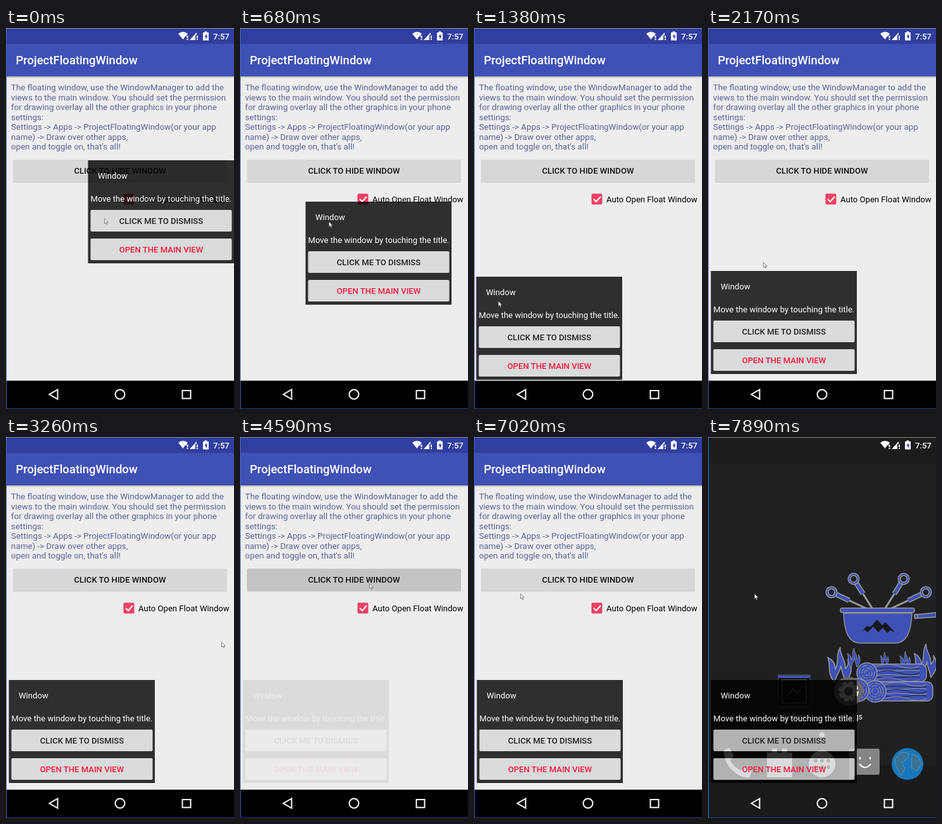
An HTML page for the animation above (8 s loop, 360 by 599 pixels).

```html
<!DOCTYPE html>
<html lang="en">
<head>
<meta charset="utf-8">
<title>Floating window</title>
<style>
html, body { margin: 0; width: 100%; height: 100%; overflow: hidden; background: #000; }
svg { display: block; width: 100vw; height: 100vh; font: 13.1px Roboto, sans-serif; }
.medium { font-weight: 500; }
.center { text-anchor: middle; }
.button { fill: #d6d7d7; }
.line { fill: none; stroke: #fff; stroke-width: 2; }
.ink { fill: #3f51b5; stroke: #999; stroke-width: 1.4; stroke-linejoin: round; }
.grain { fill: none; stroke: #999; stroke-width: 1; }
.dark { stroke: #222; }
</style>
</head>
<body>
<svg viewBox="0 0 360 599" xmlns="http://www.w3.org/2000/svg">
  <defs>
    <linearGradient id="shade" x2="0" y2="1">
      <stop stop-color="#000" stop-opacity=".28"/><stop offset="1" stop-color="#000" stop-opacity="0"/>
    </linearGradient>
    <path id="flame" d="M0 0C-12-14-5-25-10-36C-2-32 1-26 1-19C7-30 1-40 8-50C7-38 17-32 15-20C20-23 20-28 19-33C28-20 22-8 15 0C14-9 10-13 9-24C8-15 2-12 0 0Z"/>
  </defs>

  <g id="home">
    <rect width="360" height="599" fill="#202020"/>
    <rect width="360" height="42" fill="#1c1c1c"/>
    <rect y="516" width="360" height="83" fill="#1b1b1b"/>
    <g id="skewers"></g>
    <g class="ink">
      <path d="M326 279h5v6h-5zM331 279l29-3v7l-29 2z"/>
      <path d="M214 277H322C321 308 312 324 296 324H240C223 324 215 308 214 277Z"/>
      <rect x="209" y="269" width="117" height="7" rx="3"/>
      <use href="#flame" transform="translate(200 386) scale(1.1)"/>
      <use href="#flame" transform="translate(336 378) scale(1.05)"/>
      <use href="#flame" transform="translate(226 362) scale(.6)"/>
      <use href="#flame" transform="translate(276 358) scale(.4)"/>
      <use href="#flame" transform="translate(308 362) scale(.5)"/>
    </g>
    <path d="M242 307l9-10 5 2 11-12 8 9 5-5 15 16-7-3-5 4-7-8-7 7-8-9-9 9-5-4z" fill="#181818"/>
    <g id="logs"></g>
    <path d="M111 374h50v50h-50z" fill="#111" stroke="#666"/>
    <path d="M111 377h50" stroke="#3f51b5" stroke-width="4"/>
    <path d="M117 382h38v36h-38zM124 410l10-14 7 7 9-13" fill="none" stroke="#555" stroke-width="2"/>
    <circle cx="222" cy="400" r="23" fill="#666"/>
    <g fill="none" stroke="#ddd">
      <circle cx="222" cy="400" r="12" stroke-width="8" stroke-dasharray="6.3 3.1"/>
      <circle cx="222" cy="400" r="10" stroke-width="6"/>
    </g>
    <g class="center" fill="#fff" font-size="12">
      <text x="136" y="444">Gallery</text><text x="222" y="444">Settings</text>
    </g>
    <g fill="#eee">
      <circle cx="180" cy="468" r="4"/>
      <path d="M25 492l9-3 7 13-6 6q6 12 17 16l6-6 11 8-3 9q-10 3-24-8-17-13-17-35z"/>
      <path d="M93 496h40v39H93zM101 490h8v8h-8zM117 490h8v8h-8z"/>
      <circle cx="180" cy="514" r="21"/>
    </g>
    <g id="drawer" fill="#222"></g>
    <path d="M226 490h42q3 0 3 3v35q0 3-3 3h-34l-11 9v-47q0-3 3-3z" fill="#858585"/>
    <path d="M239 514q9 11 18 0" class="line"/>
    <path d="M240 503v4M256 503v4" class="line"/>
    <circle cx="315" cy="514" r="25" fill="#1976b8"/>
    <path d="M295 507l10-12 13 3-4 9-8 4 5 11-6 10-8-13zM322 499l10 3 5 12-7 11-9-5z" fill="#3a7196" stroke="#68a6cf" stroke-dasharray="2 1"/>
    <path d="M.5 0v599" stroke="#1d84c0"/>
  </g>

  <g id="app">
    <rect width="360" height="599" fill="#ededed"/>
    <rect width="360" height="26" fill="#303f9f"/>
    <rect y="25" width="360" height="51" fill="#3f51b5"/>
    <rect y="76" width="360" height="3" fill="url(#shade)"/>
    <text class="medium" x="15.500" y="57" font-size="18.5" fill="#fff">ProjectFloatingWindow</text>
    <g id="note" font-size="13.4" fill="#5a639a"></g>
    <rect x="11" y="208" width="338" height="35" rx="2" fill="#ccc"/>
    <rect id="toggle" class="button" x="11" y="207" width="338" height="35" rx="2"/>
    <text id="toggleText" class="medium center" x="180" y="229" fill="#111"></text>
    <rect x="185.500" y="260.500" width="17" height="17" rx="2" fill="#ee4062"/>
    <path d="M189 269l4 4 7-8" class="line"/>
    <text x="209" y="274">Auto Open Float Window</text>
    <rect y="554.500" width="360" height="45"/>
    <path d="M.5 0v599" stroke="#4a68ad"/>
  </g>

  <g id="panel">
    <g opacity=".8">
      <rect x="-.5" width="230.500" height="162"/>
      <rect id="dismiss" class="button" x="3.500" y="78" width="223" height="34" rx="2"/>
      <rect class="button" x="3.500" y="123" width="223" height="34" rx="2"/>
    </g>
    <text x="15" y="28.500" fill="#fff">Window</text>
    <text x="3.500" y="65" fill="#fff">Move the window by touching the title.</text>
    <text class="medium center" x="115" y="100" fill="#222">CLICK ME TO DISMISS</text>
    <text class="medium center" x="115" y="145" fill="#fa1a3c">OPEN THE MAIN VIEW</text>
  </g>

  <g fill="#fff">
    <path d="M272 9q7.500-6 15 0l-2 2.500v1.500h-2l-3.500 5z"/>
    <path id="alertMark" d="M285.500 12h2v4h-2zM285.500 17h2v2h-2z"/>
    <use href="#alertMark" x="15.500"/>
    <path d="M290 19L301 7v4h-2v8z"/>
    <path d="M311 7h2.500V5.500h4V7h2.500v12.500h-9z"/>
    <path d="M316.500 9l-3 5h2v4l3-5.500h-2z" fill="#303f9f"/>
    <text class="medium" x="327" y="17.500">7:57</text>
  </g>
  <g class="line">
    <path d="M81.500 568.500v15l-13-7.500z"/>
    <circle cx="180" cy="576" r="7.500"/>
    <rect x="278.500" y="570" width="13" height="12.500"/>
  </g>
  <path d="M0 .5h360" stroke="#8a8f9a"/>
  <path d="M0 598.500h360" stroke="#26407c"/>
  <path id="cursor" d="M.5.500v7.800l1.800-1.500 1.400 2.900 1.300-.6-1.300-2.800h2.500z" fill="#fff" stroke="#555" stroke-width=".7"/>
</svg>
<script>
const LOOP = 8000;
const $ = id => document.getElementById(id);
const clamp = k => Math.min(1, Math.max(0, k));
const smooth = k => k * k * (3 - 2 * k);
const linear = k => k;
const easeOut = k => 1 - (1 - k) ** 3;

const move = (from, to, x, y, ease = smooth) => ({ from, to, x, y, ease });
const drag = [[830, 900], [900, 1330], [1380, 1620]];

const cursorMoves = [
  move(50, 830, 138, 304),
  move(...drag[0], 114, 385, linear),
  move(...drag[1], 38, 429, easeOut),
  move(...drag[2], 39, 413),
  move(1990, 2550, 233, 230),
  move(2810, 3130, 352, 336),
  move(3130, 3260, 340, 322),
  move(3260, 3610, 204, 230),
  move(4700, 5050, 115, 470),
  move(5510, 6000, 144, 221, easeOut),
  move(6350, 7020, 73, 246, easeOut)
];
const panelMoves = [
  move(50, 500, 104, 273, easeOut),
  move(...drag[0], 94, 315, linear),
  move(...drag[1], 4, 391, easeOut),
  move(...drag[2], 5, 382)
];

// Every click flips the panel; the third lands on the panel's own button.
const clicks = [3740, 4580, 5160, 6240];
const DISMISS = 2;

function position([x, y], moves, t) {
  for (const m of moves) {
    const k = m.ease(clamp((t - m.from) / (m.to - m.from)));
    x += (m.x - x) * k;
    y += (m.y - y) * k;
  }
  return [x, y];
}
const place = (node, [x, y]) =>
  node.setAttribute("transform", `translate(${Math.round(x)} ${Math.round(y)})`);

$("note").innerHTML = [
  "The floating window, use the WindowManager to add the",
  "views to the main window. You should set the permission",
  "for drawing overlay all the other graphics in your phone",
  "settings:",
  "Settings -&gt; Apps -&gt; ProjectFloatingWindow(or your app",
  "name) -&gt; Draw over other apps,",
  "open and toggle on, that's all!"
].map((line, i) => `<text x="8" y="${98 + i * 15.5}">${line}</text>`).join("");

function skewer(side, spread, y) {
  const middle = 269.5, x = middle + side * spread, foot = middle + side * spread / 4;
  const grip = `M${x} ${y}L${(x + foot) / 2} ${(y + 270) / 2}`;
  return `<g fill="none">
    <path d="M${x} ${y}L${foot} 270" stroke="#999" stroke-width="3"/>
    <path d="${grip}" stroke="#999" stroke-width="8"/>
    <path d="${grip}" stroke="#3f51b5" stroke-width="5"/>
    <circle cx="${x}" cy="${y}" r="7" fill="#202020" stroke="#999" stroke-width="5"/>
    <circle cx="${x}" cy="${y}" r="7" stroke="#3f51b5" stroke-width="2"/></g>`;
}
$("skewers").innerHTML = [-1, 1].map(side => skewer(side, 39.5, 223) + skewer(side, 74.5, 244)).join("");

function log(x, y, length, r) {
  const wave = Array.from({ length: 7 }, (_, i) =>
    `<path class="grain ${i % 2 ? "dark" : ""}" d="M${x + r} ${y + r * (i - 3) / 4}q${length / 5} ${i % 3 * 4 - 6} ${length / 2.5} 0t${length / 3} 0"/>`);
  const rings = [4, 8, 12].map(inset =>
    `<circle class="grain" cx="${x}" cy="${y}" r="${r + 2 - inset}" stroke-dasharray="9 3"/>`);
  return `<rect class="ink" x="${x}" y="${y - r}" width="${length}" height="${2 * r}" rx="9"/>
    ${length > r ? wave.join("") : ""}
    <circle class="ink" cx="${x}" cy="${y}" r="${r + 2}"/>${rings.join("")}`;
}
$("logs").innerHTML = log(251, 371, 94, 14) + log(264, 400, 91, 15) + log(236, 398, 15, 16);

$("drawer").innerHTML = Array.from({ length: 6 }, (_, i) =>
  `<circle cx="${170 + i % 3 * 10}" cy="${509 + (i / 3 | 0) * 10}" r="2.8"/>`).join("");

function draw(t) {
  place($("cursor"), position([155, 299], cursorMoves, t));
  place($("panel"), position([130, 208], panelMoves, t));

  const flips = clicks.filter(click => t >= click).length;
  const shown = flips % 2 === 0;
  const fade = flips ? clamp((t - clicks[flips - 1]) / 120) : 1;
  $("panel").style.opacity = shown ? fade : 1 - fade;
  $("toggleText").textContent = shown ? "CLICK TO HIDE WINDOW" : "CLICK TO SHOW ALERT";

  const pressed = clicks.findIndex(click => Math.abs(t - click) < 90);
  $("dismiss").style.fill = pressed === DISMISS ? "#b8b9b9" : "";
  $("toggle").style.fill = pressed >= 0 && pressed !== DISMISS ? "#c3c4c4" : "";

  const leaving = clamp((t - 7640) / 230);
  $("app").style.opacity = 1 - leaving;
  $("app").setAttribute("transform", `translate(0 ${leaving * 20})`);
}

const start = performance.now();
function tick() {
  draw((performance.now() - start) % LOOP);
  requestAnimationFrame(tick);
}
tick();
</script>
</body>
</html>
```
